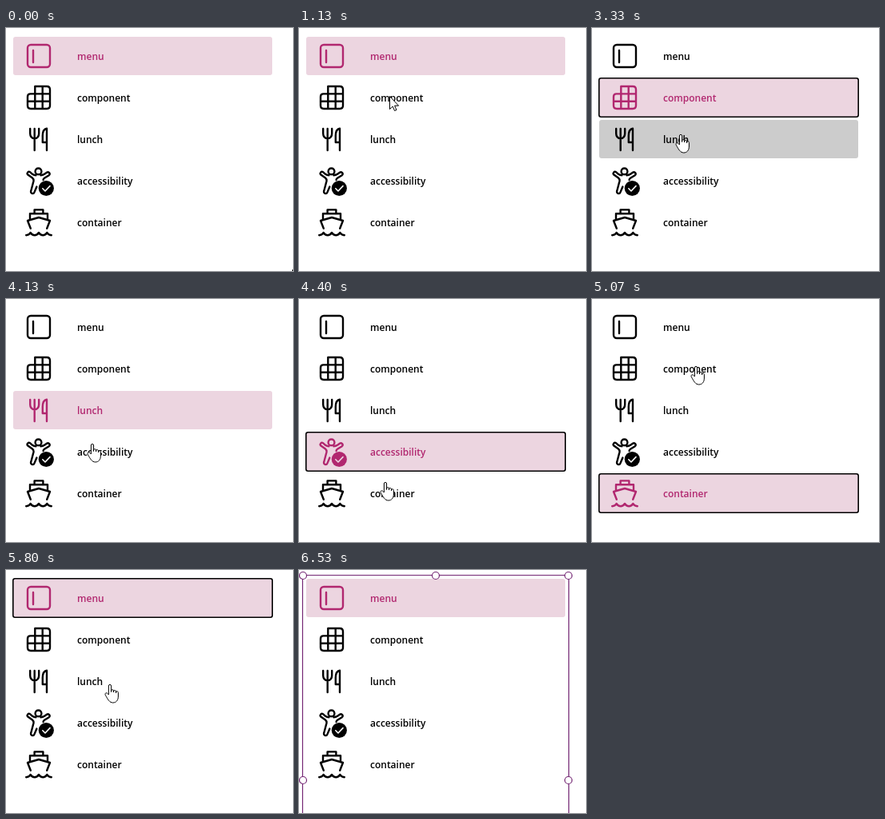
Animation, 359 px wide and 304 px high, one loop 6940 ms. Source, as an HTML page:

```html
<!DOCTYPE html>
<html lang="en">
<head>
<meta charset="utf-8">
<title>Menu</title>
<style>
  html, body { margin: 0; width: 100%; height: 100%; overflow: hidden; background: #fff; }
  svg { display: block; }
  .item { --bg: #fff; --ink: #000; }
  .item.hover { --bg: #ccc; }
  .item.selected { --bg: #ecd5e0; --ink: #b1276f; }
  .row { fill: var(--bg); }
  .ring { fill: none; stroke: #000; stroke-width: 1.6; visibility: hidden; }
  .focus .ring { visibility: visible; }
  .icon { fill: none; stroke: var(--ink); stroke-width: 2.4; stroke-linecap: round; stroke-linejoin: round; }
  .icon .badge { fill: var(--ink); stroke: none; }
  .icon .tick { stroke: var(--bg); stroke-width: 1.6; }
  text { font: 600 12px "Open Sans", "Noto Sans", sans-serif; fill: var(--ink); }
  #frame { fill: #fff; stroke: #742774; stroke-width: 1.2; }
  #frame path { fill: none; }
  .cursor { fill: #fff; stroke: #000; stroke-linejoin: round; }
</style>
</head>
<body>
<svg width="359" height="304" viewBox="0 0 359 304">
  <g id="items"></g>
  <g id="frame"><path d="M4.5 304V6.5H337.5V304"/></g>
  <path id="arrow" class="cursor" d="M.5 .5V16.6L4.2 13.1 6.6 18.5 9 17.5 6.6 12.2H11.6Z"/>
  <path id="hand" class="cursor" d="M-1.6 13V2A1.6 1.6 0 0 1 1.6 2V9.5 7.6A1.6 1.6 0 0 1 4.6 8V10 8.4A1.6 1.6 0 0 1 7.6 9V10.8 9.6A1.5 1.5 0 0 1 10.4 10.4V15C10.4 20 7.8 23 3.8 23 -.5 23 -2.6 19 -5.7 13.4 -6.8 11-4.2 10-3 11.5Z"/>
</svg>
<script>
const LOOP = 6940, TICK = 200 / 3;
const TOP = 11, PITCH = 52, HEIGHT = 48;
const LAG = 130;                       // delay before a click or hover takes effect
const PREVIEW = 2130, EDIT = [1930, 6400];
const byId = id => document.getElementById(id);

// Icons are drawn relative to the top of their row.
const icons = {
  menu: '<rect x="27" y="10" width="28" height="28" rx="4"/><path d="M34 17V32"/>',
  component: '<path d="M36.3 10H51Q55 10 55 14V34Q55 38 51 38H31Q27 38 27 34V23Q27 19.4 30.5 19.4H36.3ZM36.3 19.4H55M27 28.8H55M36.3 19.4V38M45.7 10V38"/>',
  lunch: '<path d="M30.2 11V17Q30.2 22.5 35.7 23.5 41.2 22.5 41.2 17V11M35.7 11V38M51 38V10.8C47 11.5 45.8 16 45.8 20V28H51"/>',
  accessibility: `<circle cx="40.5" cy="12.4" r="3.9"/>
    <path d="M37.4 17.3Q35 17.3 33 15.8L30 13.2A2.2 2.2 0 0 0 27 16.3L33 20.5Q34.8 21.8 34.5 24.5L31.2 37A2.2 2.2 0 0 0 35.4 38.6L38.4 31.5M43.4 17.3Q46 17.3 48.5 15.6L51.3 13.6A2.2 2.2 0 0 1 53.8 17.2L48 20.8Q46.6 21.6 46.6 23"/>
    <circle class="badge" cx="50.3" cy="33.5" r="9.6"/><path class="tick" d="M45.8 33.8 49 37 55 30.6"/>`,
  container: `<path d="M35.6 12.8V8.4H46.4V12.8M30 19.8V13.2H52V19.8M30.8 31.8 27 22 41 18 55 22 51.2 31.8"/>
    <path d="M25.2 40.2q4-.3 5.4-3.2 2 3.2 5.2 3.2t5.2-3.2q2 3.2 5.2 3.2t5.2-3.2q1.4 2.9 5.4 3.2"/>`
};

byId('items').innerHTML = Object.entries(icons).map(([name, icon], i) => `
  <g class="item" transform="translate(0 ${TOP + PITCH * i})">
    <rect class="row" x="9" width="324" height="${HEIGHT}" rx="3"/>
    <rect class="ring" x="8.8" y="-.2" width="324.4" height="48.4" rx="2.5"/>
    <g class="icon">${icon}</g>
    <text x="89" y="28.5">${name}</text>
  </g>`).join('');
const items = [...document.querySelectorAll('.item')];

const handle = (x, y) => `<circle cx="${x}" cy="${y}" r="4.5"/>`;
byId('frame').innerHTML += handle(171, 7) +
  [5, 337].map(x => handle(x, 7) + handle(x, 263)).join('');

const home = { x: 358, y: 302 };
const moves = [
  { from: 0, to: 930, x: 111, y: 83 },
  { from: 1070, to: 1200, x: 115, y: 88 },
  { from: 1930, to: PREVIEW, x: 121, y: 86 },
  { from: 2930, to: 3330, x: 111, y: 133 },
  { from: 3670, to: 4130, x: 108, y: 181 },
  { from: 4130, to: 4330, x: 108, y: 229 },
  { from: 4870, to: 5070, x: 130, y: 84 },
  { from: 5070, to: 5400, x: 123, y: 39 },
  { from: 5600, to: 6070, x: 142, y: 306 }
];
const clicks = [2800, 3530, 4070, 4800, 5470];

const ease = k => k * k * (3 - 2 * k);

function pointerAt(t) {
  return moves.reduce((p, { from, to, x, y }) => {
    const k = ease(Math.min(1, Math.max(0, (t - from) / (to - from))));
    return { x: p.x + (x - p.x) * k, y: p.y + (y - p.y) * k };
  }, home);
}

function rowAt(t) {
  const y = pointerAt(t).y - TOP, row = Math.floor(y / PITCH);
  return y - row * PITCH < HEIGHT ? row : -1;
}

// A press clears focus and hover; the selection follows a moment later.
function stateAt(t) {
  const click = clicks.findLast(c => c <= t);
  const pressed = t < click + LAG;
  const done = clicks.findLast(c => c + LAG <= t);
  const selected = done ? rowAt(done) : 0;
  const row = rowAt(t);
  return {
    selected,
    focused: done && !pressed && t < EDIT[1] ? selected : -1,
    hovered: t >= PREVIEW && !pressed && row === rowAt(t - LAG) ? row : -1
  };
}

const show = (id, on) => byId(id).style.display = on ? '' : 'none';

function draw(time) {
  const t = Math.round(Math.floor((time + 5) / TICK) * TICK / 10) * 10;
  const { selected, focused, hovered } = stateAt(t);
  items.forEach((item, i) => {
    item.classList.toggle('selected', i === selected);
    item.classList.toggle('focus', i === focused);
    item.classList.toggle('hover', i === hovered && i !== selected);
  });
  show('frame', t >= EDIT[0] && t < PREVIEW || t >= EDIT[1]);
  show('arrow', t < PREVIEW);
  show('hand', t >= PREVIEW);
  const { x, y } = pointerAt(t);
  const place = `translate(${Math.round(x)} ${Math.round(y)})`;
  byId('arrow').setAttribute('transform', place);
  byId('hand').setAttribute('transform', place);
}

const start = performance.now();
(function loop() {
  draw((performance.now() - start) % LOOP);
  requestAnimationFrame(loop);
})();
</script>
</body>
</html>
```
